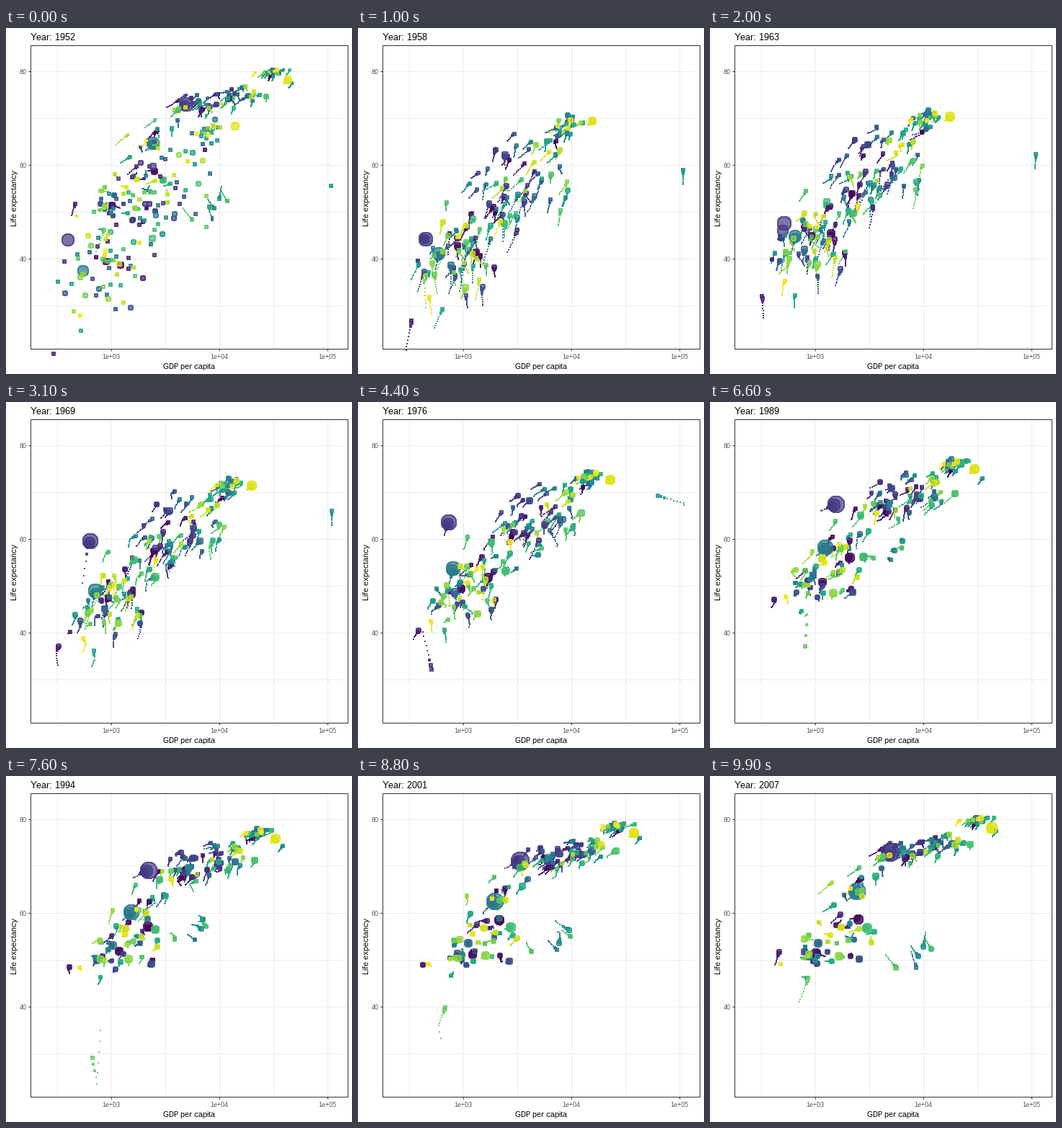
A matplotlib script that plays this animation: 480 by 480 pixels, repeating every 10 s.

```python
import numpy as np
import matplotlib.pyplot as plt
from matplotlib.animation import FuncAnimation
from matplotlib.patches import Rectangle

FRAMES, STEP_MS, WAKE = 100, 100, 9
COUNT = 142
YEARS = np.arange(1952, 2008, 5)
TIMES = np.linspace(1952, 2007, FRAMES)
CEILING = 85  # life expectancy that every region closes in on

# colour rank, population (millions) at both ends, then (year, income, life)
STANDOUTS = [
    (24, 556, 1319, [(1952, 400, 44), (1962, 488, 44.5), (1967, 613, 58.4),
                     (1977, 741, 64), (2007, 4959, 73)]),
    (58, 372, 1110, [(1952, 547, 37.4), (1977, 813, 54.2), (2007, 2452, 64.7)]),
    (134, 158, 301, [(1952, 13990, 68.4), (2007, 42952, 78.2)]),
    (72, 0.2, 2.5, [(1952, 108382, 55.6), (1972, 109348, 67.7),
                    (1982, 31354, 71.3), (2007, 47307, 77.6)]),
    (107, 2.5, 8.9, [(1952, 493, 40), (1987, 848, 44), (1992, 737, 23.6),
                     (1997, 590, 36), (2007, 863, 46.2)]),
    (18, 4.7, 14, [(1952, 368, 39.4), (1972, 422, 40.3), (1977, 525, 31.2),
                   (1982, 624, 51), (2007, 1714, 59.7)]),
]

# members, income and life (first, last), mid-period life bulge, spreads, growth
REGIONS = [
    (22, (8200, 33000), (67.5, 80), 0.5, 0.10, 0.12, 1.3),
    (11, (3900, 13500), (62, 75), 2.5, 0.18, 0.13, 1.25),
    (46, (2700, 8800), (51, 73.5), 2, 0.24, 0.20, 2.8),
    (12, (750, 2200), (41, 66), 2, 0.20, 0.17, 2.7),
    (40, (950, 1450), (39, 54), 4.5, 0.25, 0.14, 3.2),
    (5, (2300, 9000), (44, 50), 10, 0.18, 0.08, 3.0),
]


def build_tracks():
    """Return rank, log income, life and population for every bubble."""
    rng = np.random.default_rng(7)
    tracks = []
    for rank, p0, p1, path in STANDOUTS:
        year, income, life = np.array(path).T
        tracks.append((rank, np.interp(TIMES, year, np.log10(income)),
                       np.interp(TIMES, year, life), np.linspace(p0, p1, FRAMES)))

    taken = {row[0] for row in STANDOUTS}
    ranks = iter(rng.permutation([i for i in range(COUNT) if i not in taken]))
    u = np.linspace(0, 1, len(YEARS))
    for n, income, life, bulge, sd_g, sd_l, growth in REGIONS:
        mean_g = np.interp(u, [0, 1], np.log10(income))
        gap = CEILING - np.interp(u, [0, 1], life) - 4 * bulge * u * (1 - u)
        for _ in range(n):
            a, b, c, d = np.clip(rng.standard_normal(4), -1.9, 1.9)
            zg = a + (0.75 * a + 0.6 * b - a) * u
            zl = 0.5 * zg + 0.8 * (c + (d - c) * 0.6 * u)
            g = mean_g + sd_g * zg + rng.normal(0, 0.03, len(u))
            y = CEILING - gap * np.exp(-sd_l * zl + rng.normal(0, 0.015, len(u)))
            pop = min(np.exp(rng.normal(1.6, 1.2)), 85)
            tracks.append((next(ranks), np.interp(TIMES, YEARS, g),
                           np.interp(TIMES, YEARS, y),
                           np.linspace(pop, pop * growth, FRAMES)))
    tracks.sort(key=lambda t: t[0])
    return [np.array(col) for col in zip(*tracks)]


def px(log_income):
    return 146 + 150 * (log_income - 3)


def py(life):
    return 60.5 + 6.5 * (80 - life)


rank, income, life, pop = build_tracks()
X, Y = np.round(px(income)), np.round(py(life))
SIZE = 2 + 10 * np.sqrt(np.clip((pop - 0.06) / 1318.6, 0, 1))
COLORS = plt.get_cmap("viridis")(rank / (COUNT - 1))
COLORS[:, 3] = 0.7

plt.rcParams.update({"font.family": "Liberation Sans",
                     "text.hinting": "native", "text.hinting_factor": 1})
fig = plt.figure(figsize=(480 / 72, 480 / 72), dpi=72, facecolor="white")
ax = fig.add_axes([0, 0, 1, 1])
ax.set(xlim=(0, 480), ylim=(480, 0))
ax.axis("off")

LEFT, RIGHT, TOP, BOTTOM = 33.5, 473.5, 23.5, 444.5
INK, GRID, LABEL = "#333333", "#EBEBEB", "#4D4D4D"


def rule(xs, ys, color):
    ax.plot(xs, ys, color=color, lw=1, zorder=1, solid_capstyle="butt")


for decade in np.arange(2.5, 5.1, 0.5):
    x = px(decade) - 0.5
    rule([x, x], [TOP, BOTTOM], GRID)
    if decade % 1 == 0:
        rule([x, x], [BOTTOM, BOTTOM + 3], INK)
        ax.text(x, 459, f"1e+{int(decade):02d}", size=9, color=LABEL, ha="center")
for age in range(30, 81, 10):
    y = py(age) - 1
    rule([LEFT, RIGHT], [y, y], GRID)
    if age % 20 == 0:
        rule([LEFT - 3, LEFT], [y, y], INK)
        ax.text(29, y + 4.5, str(age), size=9, color=LABEL, ha="right")

ax.add_patch(Rectangle((LEFT, TOP), RIGHT - LEFT, BOTTOM - TOP,
                       fill=False, ec=INK, lw=1, zorder=5))
ax.text(254, 473, "GDP per capita", size=11, ha="center")
ax.text(17, 236, "Life expectancy", size=11, rotation=90, ha="right", va="center")
title = ax.text(34, 17, "", size=13)

bubbles = ax.scatter([], [], lw=1, zorder=3, antialiased=False)
bubbles.set_color(np.tile(COLORS, (WAKE + 1, 1)))


def draw(i):
    ages = np.arange(WAKE, -1, -1)
    at = (i - ages) % FRAMES
    fade = ((WAKE + 1 - ages) / (WAKE + 1)) ** 3
    radius = np.maximum(1, np.round(0.375 * (SIZE[:, at] * fade * 2.845 + 0.945)))
    bubbles.set_offsets(np.column_stack([X[:, at].T.ravel(), Y[:, at].T.ravel()]))
    bubbles.set_sizes((2 * radius - 1).T.ravel() ** 2)
    title.set_text(f"Year: {round(TIMES[i])}")
    return bubbles, title


anim = FuncAnimation(fig, draw, frames=FRAMES, interval=STEP_MS,
                     repeat=True, repeat_delay=0)
plt.show()
```
